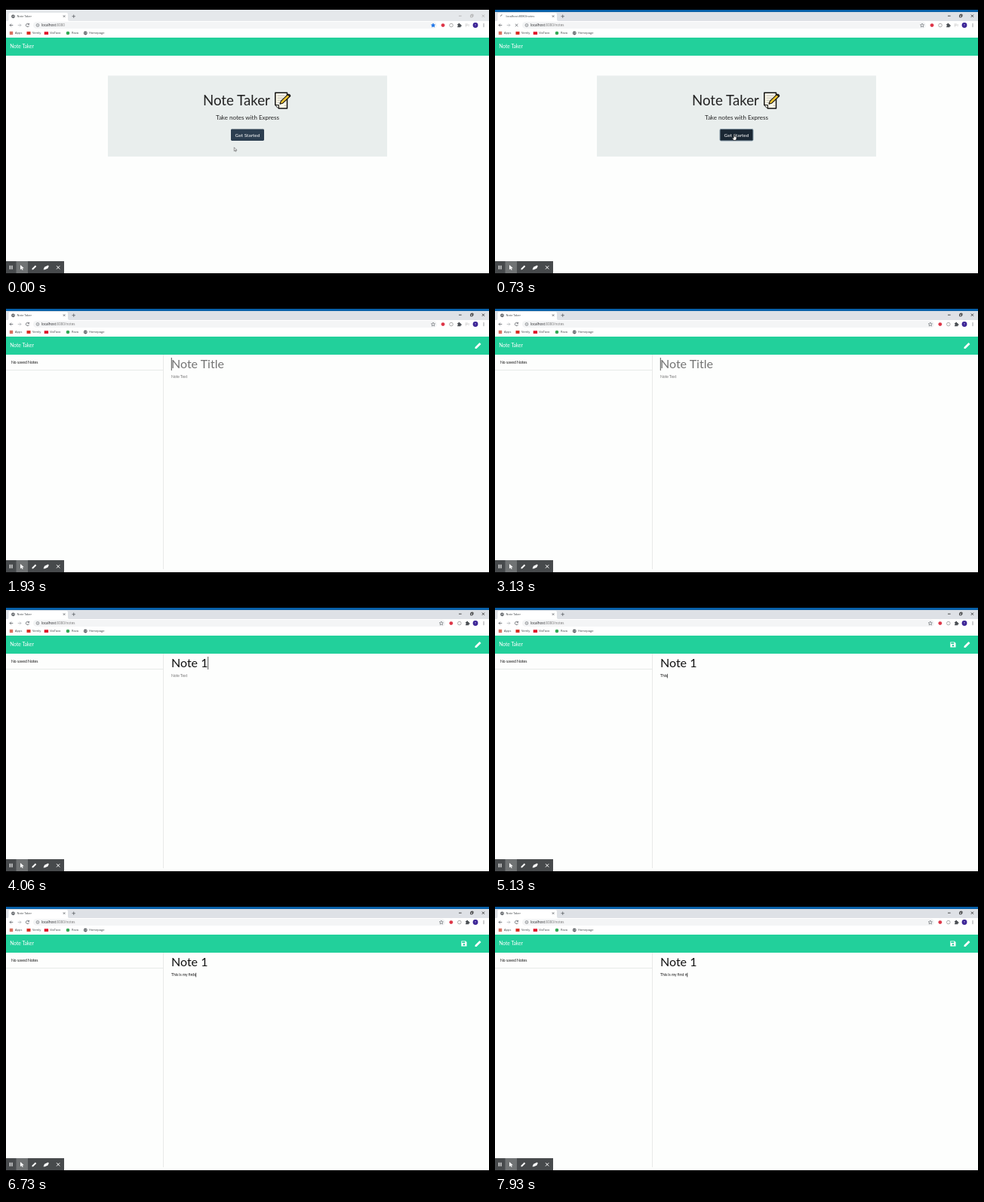
An HTML page for the animation above (8000 ms loop, 640 by 360 pixels).

```html
<!DOCTYPE html>
<html lang="en">
<head>
<meta charset="utf-8">
<title>Note Taker</title>
<style>
  html, body { margin: 0; width: 100%; height: 100%; overflow: hidden; background: #000; }
  svg { display: block; width: 100vw; height: 100vh; }
  text { font-family: Lato, sans-serif; white-space: pre; }
  .ui { font-family: "Open Sans", sans-serif; font-size: 4px; fill: #3c4043; }
  .line { fill: none; stroke: #5f6368; stroke-width: .8; }
  .light { stroke: #fff; }
</style>
</head>
<body>
<svg viewBox="0 0 640 360">
  <defs>
    <g id="globe">
      <circle r="2.4" fill="#4d5156"/>
      <path d="M-1.7-.8L-.3-.3L-.7.9L-1.2 1.2M.2-1.8L1.6-.5L.7.2L1 1.2" fill="none" stroke="#fff" stroke-width=".6"/>
    </g>
    <g id="pencil">
      <path d="M-4 4V2L2-4L4-2L-2 4Z"/>
    </g>
  </defs>

  <!-- browser frame -->
  <rect width="640" height="360"/>
  <rect id="edge" y="5" width="640" height="4"/>
  <rect id="strip" y="8" width="640" height="13"/>
  <path d="M2 20Q3.5 20 3.5 18V11Q3.5 9 5.5 9H80Q82 9 82 11V18Q82 20 84 20Z" fill="#fff"/>
  <rect y="20" width="640" height="22" fill="#fff"/>
  <use id="tabGlobe" href="#globe" x="9.5" y="13.8"/>
  <path id="tabSpinner" class="line" d="M9.5 11.8A2 2 0 0 0 7.5 13.8" stroke-width=".6"/>
  <text id="tabTitle" class="ui" x="14.5" y="15.2" style="font-size:3.9px"/>
  <path class="line" d="M75.8 12.3l2.6 2.6m0-2.6l-2.6 2.6M87.5 13.7h4.4m-2.2-2.2v4.4"/>
  <path id="windowButtons" class="line" d="M600 13.2h3.6M615.5 12.2h2.6v2.6h-2.6zM616.4 12v-.8h2.6v2.6h-.8M630.8 11.6l3.2 3.2m0-3.2l-3.2 3.2"/>

  <path class="line" d="M9.3 25.5H5m2-2l-2 2l2 2"/>
  <path class="line" d="M15.7 25.5H20m-2-2l2 2l-2 2" style="stroke:#b5b8bb"/>
  <path id="reload" class="line" d="M30.3 24.4A2.1 2.1 0 1 0 30.5 26.2M30.6 22.9V24.6H28.8"/>
  <path id="stop" class="line" d="M26.9 23.8l3.4 3.4m0-3.4l-3.4 3.4"/>
  <rect id="omnibox" x="36" y="20.9" height="9.2" rx="4.6" fill="#f4f5f6"/>
  <circle class="line" cx="42" cy="25.5" r="1.9" style="stroke-width:.6"/>
  <path class="line" d="M42 25.2v1.3m0-2.2v.4" style="stroke-width:.6"/>
  <text class="ui" x="46.8" y="27.1" style="font-size:4.6px"><tspan fill="#202124">localhost</tspan><tspan fill="#777">:8080<tspan id="path"></tspan></tspan></text>
  <g id="extensions">
    <path id="star" d="M0-2.6L.8-.8L2.6-.7L1.2.5L1.7 2.4L0 1.4L-1.7 2.4L-1.2.5L-2.6-.7L-.8-.8Z" transform="translate(566 25.6)" stroke-width=".6"/>
    <circle cx="579" cy="25.6" r="2.4" fill="#dd3648"/>
    <circle cx="590" cy="25.6" r="2.3" fill="none" stroke="#999" stroke-width=".8"/>
    <path d="M598.2 24h1.3a.9.9 0 1 1 1.7 0h1.3v1.3a.9.9 0 1 1 0 1.7v1.2h-4.3v-1.3a.8.8 0 1 0 0-1.6z" fill="#4d5156"/>
  </g>
  <path id="mediaIcon" class="line" d="M608.5 24h3.4m-3.4 1.5h3.4m-3.4 1.5h2m2.6-3v3.2" style="stroke:#bbb;stroke-width:.6"/>
  <circle cx="622" cy="25.5" r="3.4" fill="#3b2396"/>
  <text class="ui" x="622" y="26.8" text-anchor="middle" style="font-size:3.6px;fill:#fff">T</text>
  <path d="M633 23.4v4.4" stroke="#5f6368" stroke-width="1" stroke-dasharray="1 .7"/>

  <rect x="4.8" y="33.8" width="4.4" height="4.4" fill="#d9705f"/>
  <rect x="27.5" y="34" width="5" height="4" fill="#d93025"/>
  <rect x="50.7" y="34.2" width="5.4" height="3.8" fill="#e0162b"/>
  <circle cx="82" cy="36" r="2.3" fill="#34a853"/>
  <use href="#globe" x="105.3" y="36"/>
  <g class="ui">
    <text class="ui" x="12" y="37.4">Apps</text>
    <text class="ui" x="35" y="37.4">Vemly</text>
    <text class="ui" x="58.2" y="37.4">ViaTavo</text>
    <text class="ui" x="87" y="37.4">Rova</text>
    <text class="ui" x="110" y="37.4">Homepage</text>
  </g>

  <!-- page -->
  <rect y="42" width="640" height="313" fill="#fdfefd"/>
  <rect y="42" width="640" height="24" fill="#22d09b"/>
  <text x="5.3" y="56.3" font-size="6.67" fill="#fff">Note Taker</text>

  <g id="home">
    <rect x="135" y="92.5" width="370" height="107.5" fill="#e9eeed"/>
    <text x="261" y="131.6" font-size="18.67" fill="#222">Note Taker</text>
    <g stroke="#111" stroke-linejoin="round">
      <path d="M356.8 115.3H372.5V136H361.5L356.8 131.5Z" fill="#fffbe9" stroke-width="1.5"/>
      <path d="M356.8 131.5H361.5V136" fill="#d8d8d0" stroke-width="1"/>
      <path d="M359.5 119.2h10m-10 3h8m-8 3h6m-6 3h4m5 4h3" stroke="#999" stroke-width=".7"/>
      <path d="M363 130.2L364.3 126.4L373.6 117.4Q376 116.7 376.8 119.5L367 128.9Z" fill="#f7c52f" stroke-width="1.1"/>
      <path d="M373.3 117.7L376.3 120.2" stroke-width="1.5"/>
    </g>
    <text x="320" y="151" font-size="8" fill="#222" text-anchor="middle">Take notes with Express</text>
    <rect id="button" x="298" y="163.6" width="44" height="15.4" rx="1.4"/>
    <text x="320" y="173.6" font-size="6.5" fill="#fff" text-anchor="middle">Get Started</text>
  </g>

  <g id="notes">
    <path d="M0 86.5H208.5M208.5 66V351" stroke="#e3e5e4" fill="none" stroke-width=".8"/>
    <text x="7" y="77.8" font-size="5.1" fill="#111">No saved Notes</text>
    <text id="noteTitle" x="219" y="84.2" font-size="16"/>
    <text id="noteText" x="219" y="97.3" font-size="5"/>
    <path id="caret" stroke="#111" stroke-width=".7"/>
    <use href="#pencil" x="625.5" y="54" fill="#fff"/>
    <g id="save">
      <path d="M603.3 50.4H609L610.5 52V57.5H603.3Z" fill="#fff"/>
      <path d="M604.3 51.2h4v1.8h-4zM605.6 55.3a1.3 1.3 0 1 0 2.6 0a1.3 1.3 0 1 0-2.6 0" fill="#22d09b"/>
    </g>
  </g>

  <!-- recorder controls -->
  <rect y="339" width="77" height="16" fill="#474a4c"/>
  <rect x="13.5" y="339" width="15.5" height="16" fill="#707374"/>
  <path class="line light" d="M5.3 344.8v5m2.6-5v5" style="stroke-width:1.2"/>
  <path d="M19 344l4.8 4.2l-2.2.2l1.1 2.2l-1 .5l-1.1-2.2l-1.6 1.4z" fill="#fff"/>
  <g fill="#fff">
    <use href="#pencil" transform="translate(37.4 347.4) scale(.72)"/>
    <path d="M49.5 350.3L51 346.7L55.7 344.5L56.8 345.6L55.4 348.6L51.4 350.3Z"/>
  </g>
  <path class="line light" d="M67 345.2l4.3 4.3m0-4.3l-4.3 4.3" style="stroke-width:1"/>

  <g id="pointer">
    <path id="arrow" d="M0 0V5L1.2 3.9L2 5.6L2.8 5.2L2 3.6H3.6Z" fill="#fff" stroke="#333" stroke-width=".5"/>
    <path id="hand" d="M-.6 0Q0-.7.6 0V2.7L2.8 3.2Q3.5 3.5 3.3 4.6L2.6 7.5H-.8L-2.3 4.8Q-2.2 3.9-1.4 4.3L-.6 5Z" fill="#fff" stroke="#111" stroke-width=".6"/>
  </g>
</svg>
<script>
const LOOP = 8000;
const HOVER = 400, CLICK = 540, LOADING = 660, LOADED = 800;
const POINTER_HIDDEN = 930, FIELD_FOCUS = 1730, MEDIA_HIDDEN = 2200, NEXT_FIELD = 4300;

const $ = id => document.getElementById(id);
const show = (id, on) => { $(id).style.display = on ? '' : 'none'; };

// Each key is [time, character]; '<' deletes backwards.
const type = (string, start, gap) => [...string].map((char, i) => [start + i * gap, char]);
const titleKeys = type('Note 1', 3300, 125);
const textKeys = [
  ...type('This', 4600, 150),
  ...type(' is my firds', 5220, 120),
  ...type('<<st', 6860, 160),
  ...type(' n', 7500, 200)
];

const typed = (keys, t) => keys
  .filter(([time]) => time <= t)
  .reduce((string, [, char]) => char === '<' ? string.slice(0, -1) : string + char, '');

function setField(id, value, placeholder) {
  const field = $(id);
  field.textContent = value || placeholder;
  field.setAttribute('fill', value ? '#111' : '#747474');
}

function drawCaret(t, title, text) {
  const inText = t >= NEXT_FIELD;
  const keyTimes = [...titleKeys, ...textKeys].map(([time]) => time);
  const reset = Math.max(...[FIELD_FOCUS, NEXT_FIELD, ...keyTimes].filter(time => time <= t));
  show('caret', t >= FIELD_FOCUS && (t - reset) % 1060 < 530);
  const value = inText ? text : title;
  const field = $(inText ? 'noteText' : 'noteTitle');
  const x = 219.3 + (value ? field.getComputedTextLength() : 0);
  $('caret').setAttribute('d', inText ? `M${x} 92.8v5.6` : `M${x} 70v17`);
}

function draw(t) {
  const focused = t >= CLICK, loading = t >= LOADING && t < LOADED, home = t < LOADED;
  const hover = t >= HOVER, clicked = t >= LOADING;

  $('edge').setAttribute('fill', focused ? '#0860a8' : '#e5e8eb');
  $('strip').setAttribute('fill', focused ? '#dee1e6' : '#e5e8eb');
  $('windowButtons').style.stroke = focused ? '#222' : '#aaa';
  $('tabTitle').textContent = loading ? 'localhost:8080/notes' : 'Note Taker';
  $('path').textContent = clicked ? '/notes' : '';
  $('star').setAttribute('fill', clicked ? 'none' : '#1a73e8');
  $('star').setAttribute('stroke', clicked ? '#5f6368' : '#1a73e8');
  show('tabGlobe', !loading);
  show('tabSpinner', loading);
  show('reload', !loading);
  show('stop', loading);

  const media = t < MEDIA_HIDDEN;
  show('mediaIcon', media);
  $('extensions').setAttribute('transform', `translate(${media ? 0 : 10.8} 0)`);
  $('omnibox').setAttribute('width', media ? 535 : 546);

  show('home', home);
  show('notes', !home);
  $('button').setAttribute('fill', hover ? '#1a2733' : '#2c3e50');
  $('button').setAttribute('stroke', focused ? '#8296a5' : 'none');

  const p = Math.min(1, Math.max(0, (t - 60) / 440));
  const ease = p * p * (3 - 2 * p);
  show('pointer', t < POINTER_HIDDEN);
  show('arrow', !hover || !home);
  show('hand', hover && home);
  $('pointer').setAttribute('transform', `translate(${302.3 + 14.5 * ease} ${187.8 - 17 * ease})`);

  const title = typed(titleKeys, t), text = typed(textKeys, t);
  setField('noteTitle', title, 'Note Title');
  setField('noteText', text, 'Note Text');
  show('save', title && text);
  drawCaret(t, title, text);
}

const start = performance.now();
function tick() {
  draw((performance.now() - start) % LOOP);
  requestAnimationFrame(tick);
}
tick();
</script>
</body>
</html>
```
